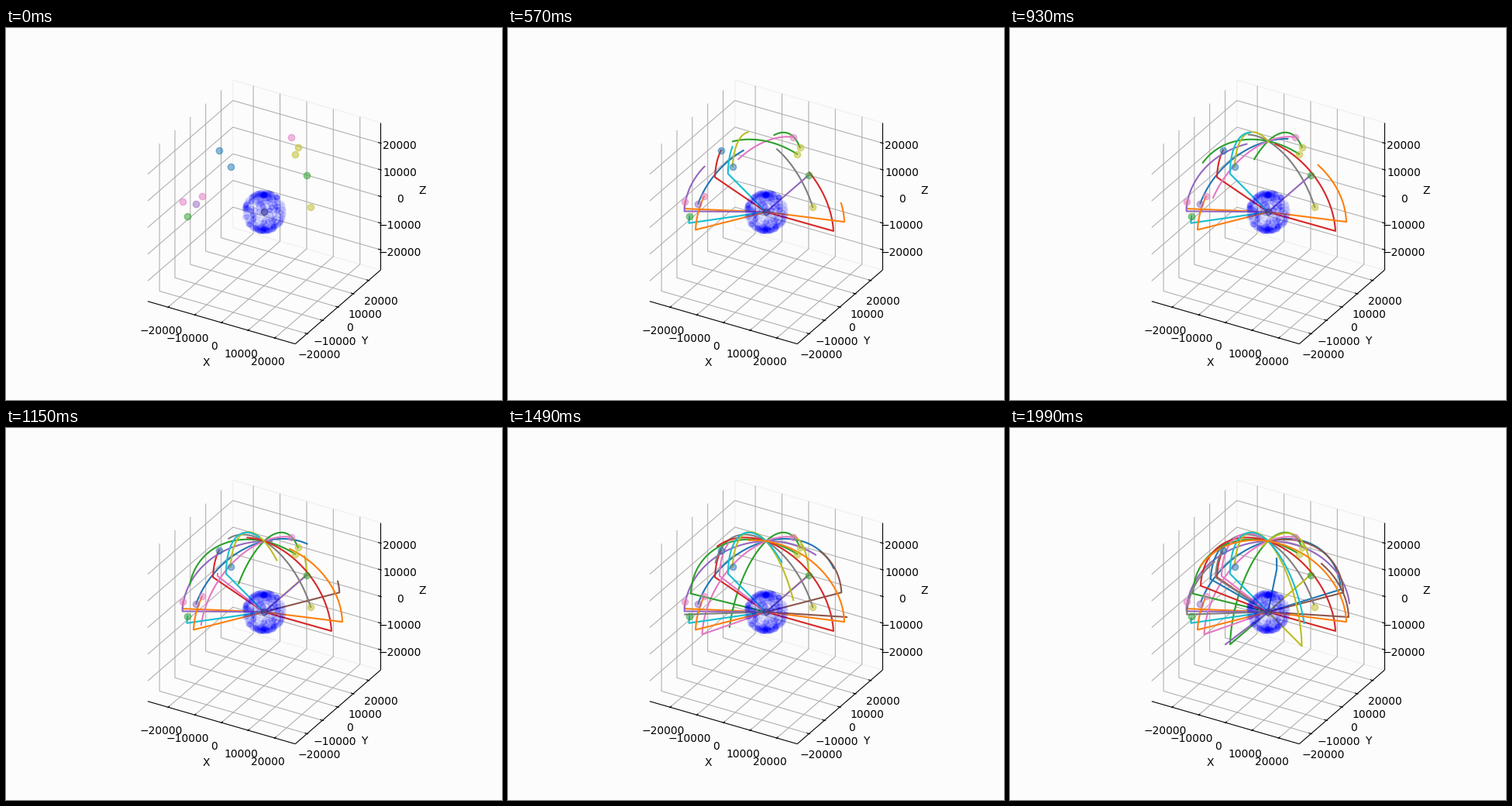
Recreate the animation shown at these times as a matplotlib script. Size 640x480 px, loop 2.01 s.

```python
import numpy as np
import matplotlib.pyplot as plt
from matplotlib.animation import FuncAnimation

W, H = 640, 480
HALF = 27667          # half edge of the plotted cube
ORBIT, EARTH = 26560, 6371
SCALE = 219.8 / (2 * HALF)
CENTER = np.array([333.0, 237.4])
STEP = 0.0327         # radians travelled per sample
MIN_Z = 0.025         # lowest visible height, in orbit radii
SAMPLES = 99
TRAIL = SAMPLES - 1

# one polar orbit each: longitude of the rising side, sample over the pole
ORBITS = [
    (-123, 36.7), (28.7, -44), (92.3, 33.6), (-21.3, -32.8), (-148, 53.1),
    (52.6, 97.4), (68.6, 13.3), (-20, 33.4), (88.6, 94), (49.3, -44),
    (164.7, 124.4), (60.4, -32.8), (7, 13), (-4.4, 48.3), (-91.4, -47.2),
    (20.1, 120.2), (154.7, 102), (-143.5, 120.1), (144.4, 44.3),
    (147.8, 60.1), (113.9, 140.1), (13.2, 66.2),
]


def view_basis(elev, azim):
    """Screen images of the unit axes for an orthographic camera."""
    e, a = np.radians([elev, azim])
    right = [-np.sin(a), np.cos(a), 0]
    down = [np.sin(e) * np.cos(a), np.sin(e) * np.sin(a), -np.cos(e)]
    return np.array([right, down]).T


BASIS = view_basis(30, -60)


def project(points):
    return CENTER + SCALE * np.asarray(points, float) @ BASIS


def on_sphere(radius, lon, lat):
    return radius * np.stack([np.cos(lat) * np.cos(lon),
                              np.cos(lat) * np.sin(lon),
                              np.sin(lat) + 0 * lon], axis=-1)


def sat_path(node, crossing):
    """Screen path; samples below the horizon collapse to the origin."""
    lat = np.pi / 2 + STEP * (np.arange(SAMPLES) - crossing)
    up = np.sin(lat) > MIN_Z
    pos = on_sphere(ORBIT, np.radians(node), lat)
    return project(pos * up[:, None]), up[0]


fig = plt.figure(figsize=(W / 100, H / 100), dpi=100, facecolor="#fcfcfc")
ax = fig.add_axes([0, 0, 1, 1])
ax.set_xlim(0, W)
ax.set_ylim(H, 0)
ax.axis("off")


def stroke(points, color, z, lw=0.8):
    ax.plot(*project(points).T, color=color, lw=lw, zorder=z,
            solid_capstyle="butt")


def label(point, text, va):
    ax.text(*project(point), text, fontsize=10, family="DejaVu Sans",
            ha="center", va=va, zorder=1.5)


def put(vec, i, value):
    """Copy of a vector with one coordinate replaced."""
    out = np.array(vec, float)
    out[i] = value
    return out


def draw_axis(i, name, edge, back):
    edge, back = HALF * np.array(edge), HALF * np.array(back)
    j, k = [n for n in range(3) if n != i]
    stroke([put(edge, i, -HALF), put(edge, i, HALF)], "black", 1.2)
    label(1.36 * edge, name, "center")
    for v in range(-20000, 20001, 10000):
        corner = put(back, i, v)
        stroke([put(corner, j, -back[j]), corner, put(corner, k, -back[k])],
               "#b0b0b0", 1)
        tick = put(edge, i, v)
        stroke([put(tick, j, f * edge[j]) for f in (1.016, 0.968)],
               "black", 1.3)
        label(put(1.166 * edge, i, v), str(v).replace("-", "\u2212"), "top")


def draw_box():
    back = (-1, 1, -1)
    edges = [(0, -1, -1), (1, 0, -1), (1, 1, 0)]
    for i, (name, edge) in enumerate(zip("XYZ", edges)):
        draw_axis(i, name, edge, back)
    pane = np.array([(1, 1, 1), (-1, 1, 1), back, (1, 1, -1)])
    stroke(HALF * pane, "#f1f1f1", 0.5, 1)


def draw_earth(n=450):
    rng = np.random.default_rng(4)
    lon = rng.uniform(0, 2 * np.pi, n)
    lat = rng.uniform(-np.pi / 2, np.pi / 2, n)
    pos = on_sphere(EARTH, lon, lat)
    near = pos @ np.cross(*BASIS.T) / -EARTH
    rgba = np.zeros((n, 4))
    rgba[:, 2] = 1
    rgba[:, 3] = 0.1 * (0.65 + 0.35 * near)
    ax.scatter(*project(pos).T, s=20, c=rgba, lw=1, zorder=3)


def marker(xy, color, alpha=0.5):
    ax.scatter(*xy, s=36, color=color, lw=1, alpha=alpha, zorder=4)


draw_box()
draw_earth()
marker(CENTER, "#303098", 0.65)

paths, lines = [], []
for n, orbit in enumerate(ORBITS):
    path, visible = sat_path(*orbit)
    paths.append(path)
    lines += ax.plot([], [], color=f"C{n % 10}", lw=1.5, zorder=2)
    if visible:
        marker(path[0], f"C{(2 * n + 4) % 10}")


def update(i):
    # the first pose holds 50 ms, every later one 20 ms
    k = max(0, (i - 3) // 2)
    for line, path in zip(lines, paths):
        line.set_data(*path[max(0, k + 1 - TRAIL):k + 1].T)
        line.set_visible(k > 0)
    return lines


anim = FuncAnimation(fig, update, frames=201, interval=10, repeat=True,
                     repeat_delay=0, blit=False)
plt.show()
```
